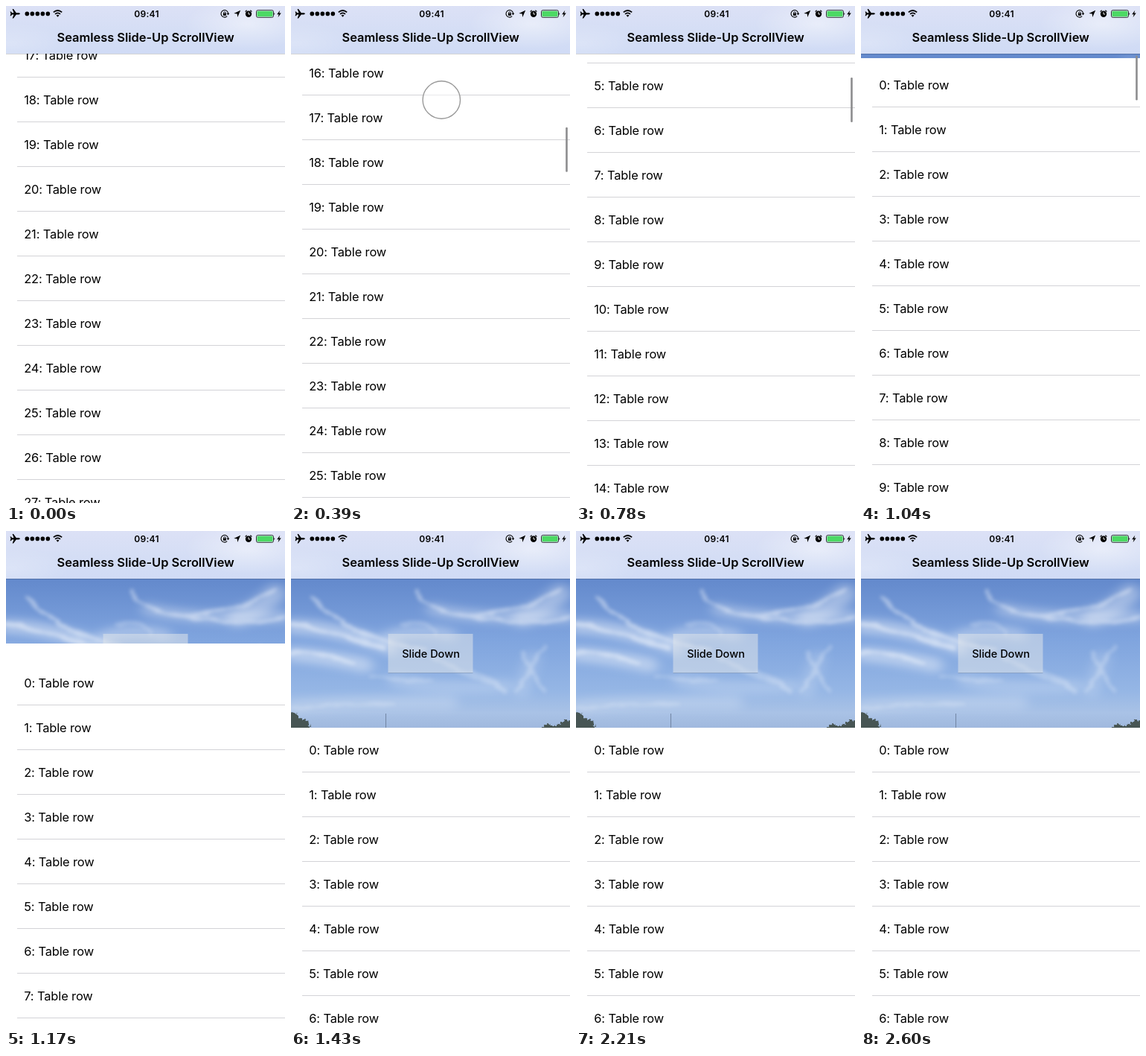
An HTML page for the animation above (2730 ms loop, 375 by 667 pixels).

```html
<!DOCTYPE html>
<html lang="en">
<head>
<meta charset="utf-8">
<title>Slide-up scroll view</title>
<style>
  html, body { margin: 0; width: 100%; height: 100%; overflow: hidden; background: #fff; }
  svg { display: block; width: 375px; height: 667px; }
  text { font: 16.4px Inter, "Liberation Sans", sans-serif; fill: #000; }
  #rows text { letter-spacing: -.1px; }
  .title { font-weight: 600; text-anchor: middle; }
  .button { font-size: 14.5px; font-weight: 500; text-anchor: middle; }
  .clock { font-size: 12px; font-weight: 600; letter-spacing: .3px; text-anchor: middle; }
  .line { fill: none; stroke: #fff; stroke-linecap: round; }
</style>
</head>
<body>
<svg viewBox="0 0 375 667">
  <defs>
    <linearGradient id="sky" x2="0" y2="1">
      <stop offset="0" stop-color="#6389cc"/>
      <stop offset=".4" stop-color="#7fa4de"/>
      <stop offset=".75" stop-color="#95b6e5"/>
      <stop offset=".9" stop-color="#a9c2e6"/>
      <stop offset="1" stop-color="#a0b9de"/>
    </linearGradient>
    <linearGradient id="bar" x2="0" y2="1">
      <stop offset="0" stop-color="#dce1f6"/>
      <stop offset=".5" stop-color="#d5def5"/>
      <stop offset="1" stop-color="#d0dbf5"/>
    </linearGradient>
    <radialGradient id="glow">
      <stop offset="0" stop-color="#fff" stop-opacity=".55"/>
      <stop offset="1" stop-color="#fff" stop-opacity="0"/>
    </radialGradient>
    <filter id="haze" filterUnits="userSpaceOnUse" x="-40" y="40" width="455" height="250">
      <feGaussianBlur stdDeviation="8 6"/>
    </filter>
    <filter id="wisp" filterUnits="userSpaceOnUse" x="-40" y="40" width="455" height="250">
      <feTurbulence type="fractalNoise" baseFrequency=".03 .08" numOctaves="3" seed="9"/>
      <feDisplacementMap in="SourceGraphic" scale="9" xChannelSelector="R" yChannelSelector="G"/>
      <feGaussianBlur stdDeviation="2.6"/>
    </filter>
    <filter id="leaves" filterUnits="userSpaceOnUse" x="-10" y="230" width="395" height="45">
      <feTurbulence type="fractalNoise" baseFrequency=".25" numOctaves="2" seed="2"/>
      <feDisplacementMap in="SourceGraphic" scale="8" xChannelSelector="R" yChannelSelector="G"/>
      <feGaussianBlur stdDeviation=".5"/>
    </filter>
  </defs>

  <!-- photo behind the table -->
  <rect y="64" width="375" height="200" fill="url(#sky)"/>
  <g class="line" filter="url(#haze)">
    <path stroke-width="20" opacity=".4" d="M0 128 Q60 130 135 157 M0 165 Q45 168 100 180"/>
    <path stroke-width="16" opacity=".32" d="M130 142 Q170 128 215 140 M190 105 Q250 120 375 115"/>
    <path stroke-width="26" opacity=".36" d="M310 116 Q335 110 362 84"/>
    <path stroke-width="18" opacity=".2" d="M0 236 Q80 228 215 230 M140 200 Q190 214 290 208 M325 170 L310 215"/>
  </g>
  <g class="line" filter="url(#wisp)">
    <path stroke-width="5" opacity=".42" d="M28 90 Q60 122 100 138 T180 160 M0 125 Q55 134 125 158 M0 164 Q40 163 85 177"/>
    <path stroke-width="4.5" opacity=".4" d="M168 80 Q180 104 225 112 T310 122 Q345 122 375 115 M240 112 Q310 112 362 80"/>
    <path stroke-width="5" opacity=".27" d="M340 155 Q325 178 304 215 M311 162 Q316 182 342 216 M245 190 Q268 197 288 216 M190 168 Q225 190 270 205"/>
    <path stroke-width="4" opacity=".22" d="M0 238 Q60 231 140 232 M105 196 Q150 199 190 201 M150 126 Q175 116 195 138"/>
  </g>
  <g fill="#3b4740" opacity=".88" filter="url(#leaves)">
    <path d="M-6 243 L7 244 12 252 23 254 26 270 H-6 Z"/>
    <path d="M332 268 L342 260 356 261 366 255 382 254 V270 Z"/>
  </g>
  <path d="M127.5 245 V264" stroke="#6d7f9c" stroke-width=".9"/>

  <rect x="130.5" y="138" width="114" height="52.5" fill="#dfe3ea" opacity=".55"/>
  <path d="M130.5 190.5 H244.5" stroke="#7890b2" opacity=".6"/>
  <text class="button" x="188" y="169.5">Slide Down</text>

  <rect id="sheet" width="375" height="667" fill="#fff"/>
  <g id="rows"></g>
  <rect id="thumb" x="369.2" width="2.6" height="60" rx="1.3" fill="#8c8c8e"/>

  <!-- navigation and status bar -->
  <rect width="375" height="64" fill="url(#bar)"/>
  <svg width="375" height="64">
    <ellipse cx="325" cy="24" rx="85" ry="34" fill="url(#glow)" opacity=".8"/>
    <ellipse cx="5" cy="50" rx="80" ry="28" fill="url(#glow)" opacity=".4"/>
  </svg>
  <rect y="64" width="375" height="1" opacity=".17"/>
  <text class="title" x="187.7" y="48">Seamless Slide-Up ScrollView</text>
  <text class="clock" x="189" y="14.7">09:41</text>

  <path d="M19 10.3 Q18.5 9.2 17 9.2 H13.8 L10 4 H8.6 L10.5 9.2 H8.2 L6.7 7.4 H5.6 L6.4 10.3 5.6 13.2 H6.7 L8.2 11.4 H10.5 L8.6 16.6 H10 L13.8 11.4 H17 Q18.5 11.4 19 10.3Z"/>
  <g id="signal"></g>
  <g fill="none" stroke="#000" stroke-width="1.7">
    <path d="M63.8 8.4 Q69.5 3.6 75.2 8.4 M66 10.8 Q69.5 7.8 73 10.8"/>
    <path d="M69.5 14.8 L67.5 12.6 Q69.5 11 71.5 12.6Z" fill="#000" stroke="none"/>
    <path d="M297.2 13.7 A4.8 4.8 0 1 1 298.6 10" stroke-width="1.1"/>
    <path d="M296.4 9.8 H300.4 L298.5 12.3Z" fill="#000" stroke="none"/>
    <path d="M292.6 10 V8.6 Q293.9 6.8 295.2 8.6 V10" stroke-width=".9"/>
    <rect x="291.9" y="9.7" width="4" height="3.2" fill="#000" stroke="none"/>
    <path d="M315.2 5.8 L311.2 15 310.7 10.6 306.3 10.1Z" fill="#000" stroke="none"/>
    <circle cx="326" cy="10.8" r="4.2" fill="#000" stroke="none"/>
    <path d="M321.6 7.6 L323.6 5.8 M330.4 7.6 L328.4 5.8" stroke-width="1.2"/>
    <path d="M326 8.2 V11 H328.2" stroke="#fff" stroke-width=".9"/>
    <rect x="336.5" y="5.7" width="23" height="9.6" rx="2" stroke-width=".8"/>
    <rect x="337.5" y="6.7" width="21" height="7.6" rx="1" fill="#4cd964" stroke="none"/>
    <path d="M360.4 8.7 Q362.2 10.5 360.4 12.3Z" fill="#000" stroke="none"/>
    <path d="M368.3 5.8 L364.2 11.2 H366.7 L365.6 15.2 369.8 9.6 H367.2Z" fill="#000" stroke="none"/>
  </g>

  <circle id="touch" cx="202.3" r="25.2" fill="#fff" fill-opacity=".5" stroke="#999" stroke-width="1.4"/>
</svg>
<script>
const STEP = 130, STEPS = 21;
const REST = 264, BAR = 64;

// Top of row 0 at each step: drag, momentum, then settling.
const contentTop = [-984, -984, -984, -900, -669, -442, -223, -54, 76, 174, 239, REST];
// Upper edge of the white sheet once it starts to slide down.
const SLIDE_START = 8;
const sheetTop = [70, 151, 229, REST];

const byId = id => document.getElementById(id);
const sheet = byId("sheet"), rows = byId("rows"), thumb = byId("thumb"), touch = byId("touch");
const show = (element, visible) => element.setAttribute("visibility", visible ? "visible" : "hidden");

rows.innerHTML = Array.from({ length: 30 }, (_, i) => `
  <text x="24.2" y="${i * 60 + 36}">${i}: Table row</text>
  <rect x="15" y="${i * 60 + 59}" width="360" height="1" fill="#d3d3d7"/>`).join("");

byId("signal").innerHTML = Array.from({ length: 5 }, (_, i) =>
  `<circle cx="${28.3 + i * 7}" cy="10.4" r="2.8"/>`).join("");

function draw(now) {
  const step = Math.floor(now / STEP) % STEPS;
  const top = contentTop[step] ?? REST;
  const edge = step < SLIDE_START ? BAR : sheetTop[step - SLIDE_START] ?? REST;

  sheet.setAttribute("y", edge);
  rows.setAttribute("transform", `translate(0 ${top})`);

  thumb.setAttribute("y", 74 - top * .0987);
  show(thumb, step >= 3 && step <= SLIDE_START);

  touch.setAttribute("cy", top + 1026);
  show(touch, step === 3 || step === 4);
}

const start = performance.now();
function tick() {
  draw(performance.now() - start);
  requestAnimationFrame(tick);
}
tick();
</script>
</body>
</html>
```
